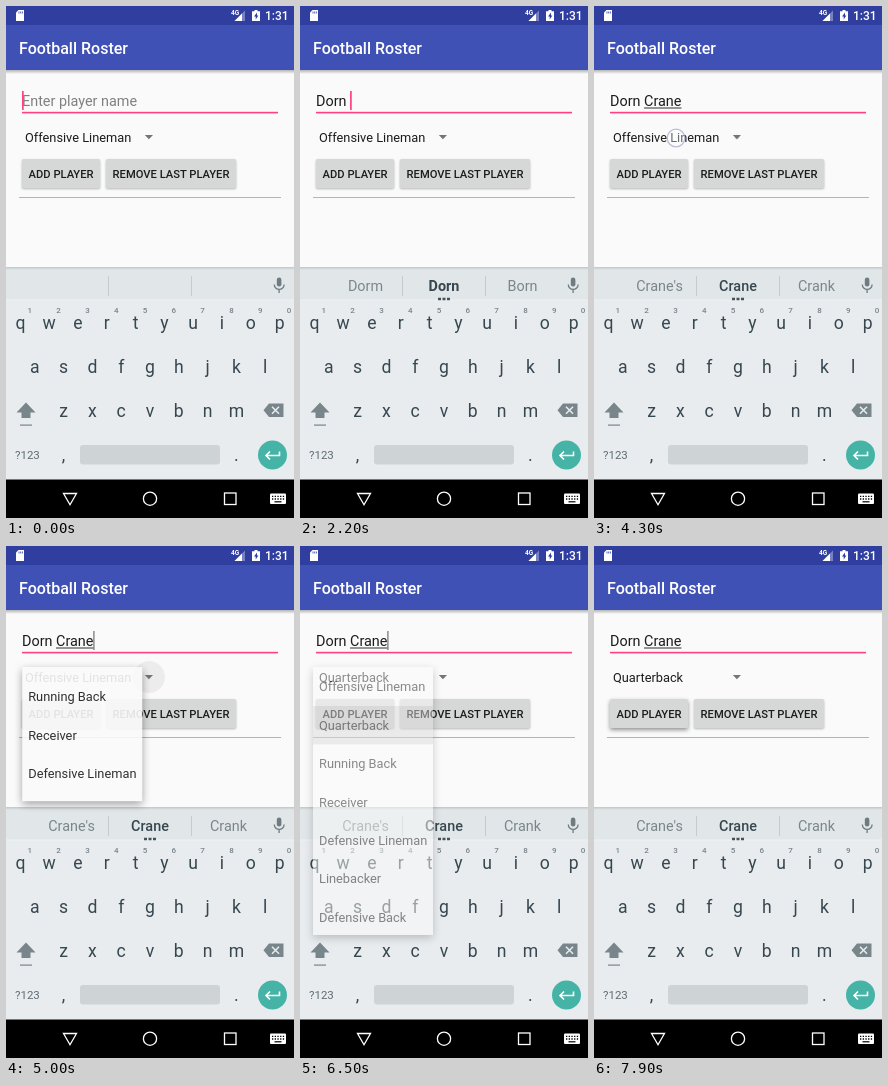
Recreate the animation shown at these times as an HTML page. Size 288 px wide and 512 px high, loop 8000 ms.

```html
<!DOCTYPE html>
<html lang="en">
<head>
<meta charset="utf-8">
<title>Football Roster</title>
<style>
  html, body { margin: 0; width: 100%; height: 100%; overflow: hidden; background: #fafafa; }
  svg { display: block; width: 288px; height: 512px; font-family: Roboto, sans-serif; }
  text { white-space: pre; }
  .mid { text-anchor: middle; }
  .med { font-weight: 500; }
  .label { font-size: 12.8px; fill: #1c1c1c; }
  .btn { font-size: 11.2px; font-weight: 500; fill: #1c1c1c; }
  .key { font-size: 17.6px; fill: #37474f; }
  .hint { font-size: 8px; font-weight: 500; fill: #78848a; }
  .sugg { font-size: 14.4px; fill: #7b868b; }
  .raised { filter: drop-shadow(0 1px 1px rgba(0,0,0,.28)); }
  #panel { filter: drop-shadow(0 3px 4px rgba(0,0,0,.4)); }
</style>
</head>
<body>
<svg viewBox="0 0 288 512">
  <defs>
    <linearGradient id="fade" x2="0" y2="1">
      <stop stop-color="#000" stop-opacity=".28"/><stop offset="1" stop-color="#000" stop-opacity="0"/>
    </linearGradient>
    <clipPath id="clip"><rect id="clipBox"/></clipPath>
  </defs>
  <rect width="288" height="512" fill="#fafafa"/>

  <!-- status bar and toolbar -->
  <rect y="64" width="288" height="4" fill="url(#fade)"/>
  <rect width="288" height="64" fill="#3f51b5"/>
  <rect width="288" height="19" fill="#303f9f"/>
  <path d="M12.5 4H18V15H10V6.5Z" fill="#fff"/>
  <path d="M13 5.5v2M14.7 5.5v2M16.4 5.5v2" stroke="#303f9f" stroke-width=".8"/>
  <text x="225" y="9" font-size="6.5" font-weight="700" fill="#fff">4G</text>
  <path d="M239 4.500V15H228.500Z" fill="#fff" opacity=".35"/>
  <path d="M236 7.500V15H228.500Z" fill="#fff"/>
  <path d="M246 5.200h2.500V4h3v1.200H254V15H246Z" fill="#fff"/>
  <path d="M251 6.500L248 10.600H249.700V13.600L252.400 9.500H251Z" fill="#303f9f"/>
  <text x="259" y="13.800" font-size="12" class="med" fill="#fff">1:31</text>
  <text x="13" y="48" font-size="16" class="med" fill="#fff">Football Roster</text>

  <!-- form -->
  <text id="hint" x="16" y="100.400" font-size="14.4" fill="#808080">Enter player name</text>
  <text id="name" x="16" y="100.400" font-size="14.4" fill="#1c1c1c"></text>
  <rect id="underline" y="101.500" height="1" fill="#333"/>
  <rect x="16" y="105.800" width="256" height="1.600" fill="#ff4081"/>
  <rect id="cursor" y="85" height="19"/>
  <circle id="ripple" cx="143" cy="131" fill="#000"/>
  <text id="choice" x="19" y="135.600" class="label"></text>
  <path d="M138.800 129H147L142.900 133.200Z" fill="#757575"/>
  <rect id="add" class="raised" x="16" y="153" width="78" height="29" rx="1.600" fill="#d6d7d7"/>
  <rect class="raised" x="100" y="153" width="130" height="29" rx="1.600" fill="#d6d7d7"/>
  <text x="55" y="172" class="btn mid">ADD PLAYER</text>
  <text x="165" y="172" class="btn mid">REMOVE LAST PLAYER</text>
  <rect x="13" y="191" width="262" height="1" fill="#b4b4b4"/>

  <!-- keyboard -->
  <g id="strip">
    <rect y="261" width="288" height="34" fill="#e1e6e9"/>
    <rect y="261" width="288" height="3" fill="url(#fade)" opacity=".5"/>
    <path d="M102.500 270V290M185.500 270V290" stroke="#c5cbce"/>
    <rect x="270.800" y="271.500" width="4.600" height="9" rx="2.300" fill="#6f7b80"/>
    <path d="M268.300 278.500a4.900 4.900 0 0 0 9.800 0M273.100 283.400V287" fill="none" stroke="#6f7b80" stroke-width="1.300"/>
    <g id="words">
      <text class="sugg mid" x="65.500" y="285"></text>
      <text class="sugg mid med" x="144" y="285" style="fill:#37474f"></text>
      <text class="sugg mid" x="222.500" y="285"></text>
    </g>
  </g>
  <g id="keys">
    <rect y="294" width="288" height="180" fill="#e8ecef"/>
    <rect y="293.500" width="288" height="1" fill="#f1f4f5"/>
    <path d="M20 396.500L29.500 406.500H24.500V412H15.500V406.500H10.500Z" fill="#78868c"/>
    <rect x="14" y="418.500" width="12" height="1.200" fill="#78868c"/>
    <path d="M263 397.500H277.500V411H263L257.500 404.200Z" fill="#78868c"/>
    <path d="M266 400.800l7 7m0-7l-7 7" stroke="#e8ecef" stroke-width="1.500"/>
    <text x="9" y="453" font-size="11.500" fill="#5f6c72">?123</text>
    <rect x="74" y="439" width="140" height="19.500" rx="3" fill="#ced3d6"/>
    <circle cx="266.500" cy="449" r="14.500" fill="#45b3a6"/>
    <path d="M273.500 445.500V449.500H260.500M264 445.500L260 449.500L264 453.500" fill="none" stroke="#fff" stroke-width="1.600"/>
  </g>
  <path id="dots" d="M138 291.700h3v2.600h-3zM142.500 291.700h3v2.600h-3zM147 291.700h3v2.600h-3z" fill="#455358"/>
  <rect y="473.500" width="288" height="39"/>
  <g fill="none" stroke="#fff" stroke-width="1.300">
    <path d="M57.500 487.500H70.500L64 498.800Z"/>
    <circle cx="144" cy="492.700" r="6.600"/>
    <rect x="218.500" y="487" width="11.500" height="11.500"/>
  </g>
  <rect x="264" y="487.500" width="16" height="10.500" rx="1" fill="#fff"/>
  <path d="M266 490.300H278.500M266 493H278.500" stroke="#000" stroke-width="1.300" stroke-dasharray="1.300 1.400"/>
  <path d="M268.500 495.800H275.500" stroke="#000" stroke-width="1.200"/>

  <!-- drop-down list -->
  <g id="popup">
    <rect id="panel" fill="#fafafa"/>
    <g clip-path="url(#clip)"><g id="items">
      <rect id="pick" x="13" y="160" width="120" height="38.400" fill="#000" opacity=".12"/>
    </g></g>
  </g>
  <circle id="touch" r="8.800" fill="#fff" fill-opacity=".35" stroke="#9a9cc6" stroke-opacity=".65" stroke-width="1.300"/>
</svg>
<script>
const $ = id => document.getElementById(id);
const LOOP = 8000, STEP = 100, LAG = 100;
const NAME = 'Dorn Crane';
const typedAt = [1200, 1400, 1600, 1800, 2200, 2300, 2500, 2700, 3300, 3500];
const guesses = ["Do,D,Don't", 'Door,Do,Dog', 'Dorm,Dor,Dory', 'Dorm,Dorn,Born', '',
  'Can,C,Could', 'Create,Cr,Crew', 'Craft,Cra,Crafting', "Crank,Cran,Crane", "Crane's,Crane,Crank"];
const positions = ['Offensive Lineman', 'Quarterback', 'Running Back', 'Receiver',
  'Defensive Lineman', 'Linebacker', 'Defensive Back'];
const taps = [[4300, 4700, 82, 132], [6100, 6400, 41, 175], [7500, 7900, 49, 168]];
const cursorOn = [[0, 100], [700, 4100], [4600, 6800], [7100, 7600]];

const within = (t, a, b) => t >= a && t < b;
const ramp = (t, a, b) => Math.min(1, Math.max(0, (t - a) / (b - a)));
const smooth = x => x * x * (3 - 2 * x);
const show = (el, on) => el.style.display = on ? '' : 'none';
const set = (el, attrs) => { for (const k in attrs) el.setAttribute(k, attrs[k]); };

function addText(parent, x, y, str, cls) {
  const el = document.createElementNS('http://www.w3.org/2000/svg', 'text');
  set(el, { x, y, class: cls });
  el.textContent = str;
  parent.append(el);
}

['qwertyuiop', 'asdfghjkl', 'zxcvbnm'].forEach((row, r) =>
  [...row].forEach((c, i) =>
    addText($('keys'), 28.8 * (i + [.5, 1, 2][r]), 323 + 44 * r, c, 'key mid')));
[...'1234567890'].forEach((c, i) => addText($('keys'), 23.8 + 28.8 * i, 307, c, 'hint mid'));
addText($('keys'), 57.6, 455, ',', 'key mid');
addText($('keys'), 230.4, 455, '.', 'key mid');
positions.forEach((s, i) => addText($('items'), 19, 145.3 + 38.4 * i, s, 'label'));

function drawField(t) {
  const count = typedAt.filter(a => t >= a).length;
  const noStrip = within(t, 6600, 7000), idle = within(t, 6600, 7100);
  const name = $('name');
  name.textContent = NAME.slice(0, count);
  show($('hint'), !count);
  const width = count ? name.getComputedTextLength() : 0;

  const start = count > 5 ? 5 : 0;
  const settled = count && t >= typedAt[count - 1] + LAG;
  const composing = settled && count !== 5 && !idle;
  show($('underline'), composing);
  if (composing) {
    const left = start ? name.getSubStringLength(0, start) : 0;
    set($('underline'), { x: 16 + left, width: width - left });
  }

  const unfocused = within(t, 4600, 6800);
  show($('cursor'), cursorOn.some(([a, b]) => within(t, a, b)));
  set($('cursor'), { x: 16 + width, width: unfocused ? 1 : 1.7, fill: unfocused ? '#555' : '#ff4081' });

  // suggestions trail the typing by one step
  const seen = typedAt.filter(a => t >= a + LAG).length;
  const words = seen && !idle ? guesses[seen - 1].split(',') : [''];
  [...$('words').children].forEach((el, i) => el.textContent = words[i] || '');
  $('words').children[1].style.fontWeight = seen < 10 ? 700 : 500;
  show($('dots'), words[0]);
  show($('strip'), !noStrip);
}

function drawPopup(t) {
  const p = smooth(ramp(t, 4820, 5200));
  const open = p > 0 && t < 6600;
  show($('popup'), open);
  $('choice').textContent = positions[t < 6500 ? 0 : 1];
  set($('ripple'), {
    r: 16 * smooth(ramp(t, 4200, 4600)),
    opacity: .08 * (1 - ramp(t, 4900, 5200))
  });
  if (!open) return;
  // the list opens outward from its middle while sliding down from the spinner
  const height = 20 + 248 * p, dx = 6 * (1 - p), dy = -124 * (1 - p);
  const box = { x: 13 + dx, y: 255 + dy - height / 2, width: 120, height };
  set($('panel'), box);
  set($('clipBox'), box);
  set($('items'), { transform: `translate(${dx} ${dy})` });
  set($('popup'), { opacity: Math.min(1, p * 1.95) * (1 - ramp(t, 6400, 6600)) });
  show($('pick'), t >= 6200);
}

function draw(t) {
  drawField(t);
  drawPopup(t);
  const lift = ramp(t, 7500, 7700);
  $('add').style.filter = `drop-shadow(0 ${1 + lift}px ${1 + lift}px rgba(0,0,0,${.28 + .14 * lift}))`;
  const tap = taps.find(([a, b]) => within(t, a, b));
  show($('touch'), tap);
  if (tap) set($('touch'), { cx: tap[2], cy: tap[3] });
}

function frame() {
  draw(Math.floor(performance.now() % LOOP / STEP) * STEP);
  requestAnimationFrame(frame);
}
frame();
</script>
</body>
</html>
```
